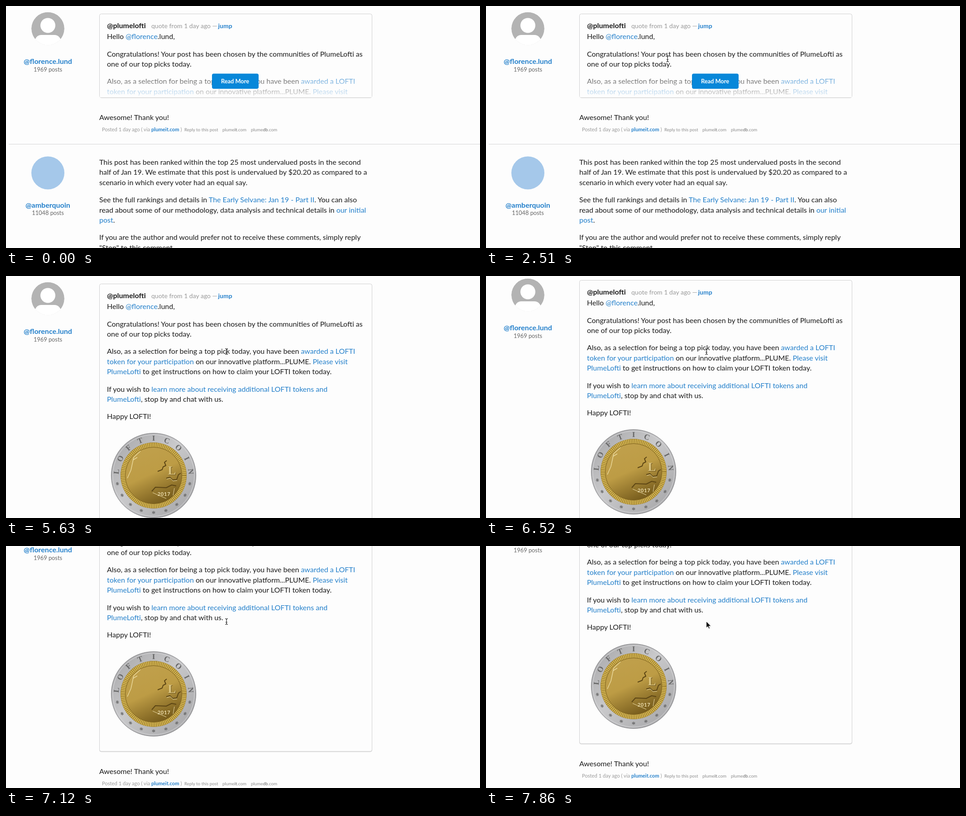
An HTML page for the animation above (8 s loop, 1047 by 535 pixels).

```html
<!DOCTYPE html>
<html lang="en">
<head>
<meta charset="utf-8">
<title>Forum thread</title>
<style>
  html, body { margin: 0; width: 100%; height: 100%; overflow: hidden; background: #fdfdfd; }
  svg { display: block; }
  text { font: 16px Lato, sans-serif; fill: #1b1b1b; white-space: pre; }
  a { fill: #2480cb; }
  .bold, .name { font-weight: 700; }
  .name { fill: #2480cb; }
  .name, .count, .mid { text-anchor: middle; }
  .count { font-size: 12.8px; fill: #666; }
  .quote { font-size: 14px; fill: #999; }
  .meta { font-size: 11.2px; fill: #999; }
  .tiny { font-size: 9.8px; fill: #8c8c8c; }
  .button { font-size: 12.8px; font-weight: 700; fill: #fff; }
  #box { filter: drop-shadow(0 1px 0 #0002); }
  .serif { font-family: "Liberation Serif", serif; font-weight: 700; }
  #ring text { font-size: 17px; fill: #686868; }
</style>
</head>
<body>
<svg width="1047" height="535" viewBox="0 0 1047 535">
  <defs>
    <linearGradient id="fade" x2="0" y2="1">
      <stop stop-color="#fdfdfd" stop-opacity="0"/>
      <stop offset="1" stop-color="#fdfdfd" stop-opacity=".88"/>
    </linearGradient>
    <linearGradient id="silver" x2="1" y2="1">
      <stop stop-color="#a4a4a6"/>
      <stop offset=".45" stop-color="#c9c9cb"/>
      <stop offset="1" stop-color="#a2a2a4"/>
    </linearGradient>
    <linearGradient id="gold" x1=".3" x2=".75" y2="1">
      <stop stop-color="#c0a04c"/>
      <stop offset=".45" stop-color="#bd9c45"/>
      <stop offset="1" stop-color="#6f5518"/>
    </linearGradient>
    <clipPath id="round"><circle cx="92.5" cy="50" r="36.5"/></clipPath>
  </defs>

  <g id="page">
    <g clip-path="url(#round)">
      <circle cx="92.5" cy="50" r="36.5" fill="#b3b3b3"/>
      <circle cx="92.5" cy="43" r="16.5" fill="#fff"/>
      <rect x="64" y="64" width="57" height="40" rx="14" fill="#fff"/>
    </g>
    <text class="name" x="92.5" y="128">@florence.lund</text>
    <text class="count" x="92.5" y="145">1969 posts</text>

    <rect id="box" x="206.5" y="17.5" width="602" rx="4" fill="#fdfdfd" stroke="#cfcfd0"/>
    <text class="bold" x="223" y="49">@plumelofti</text>
    <text class="quote" x="321" y="49">quote from 1 day ago —</text>
    <text class="quote" x="468.5" y="49"><a id="jump" class="bold">jump</a></text>
    <text x="223" y="73">Hello <a>@florence</a>.lund,</text>
    <text x="223" y="112">Congratulations! Your post has been chosen by the communities of PlumeLofti as</text>
    <text x="223" y="134">one of our top picks today.</text>
    <text x="223" y="172">Also, as a selection for being a top pick today, you have been <a>awarded a LOFTI</a></text>
    <text x="223" y="195"><a>token for your participation</a> on our innovative platform...PLUME. <a>Please visit</a></text>

    <g id="fold">
      <rect x="207" y="135" width="601" height="67" fill="url(#fade)"/>
      <rect x="455" y="149.5" width="103" height="33.5" rx="4" fill="#0787d9"/>
      <text class="button mid" x="506" y="171">Read More</text>
    </g>

    <g id="more">
      <text x="223" y="217"><a>PlumeLofti</a> to get instructions on how to claim your LOFTI token today.</text>
      <text x="223" y="256">If you wish to <a>learn more about receiving additional LOFTI tokens and</a></text>
      <text x="223" y="278"><a>PlumeLofti</a>, stop by and chat with us.</text>
      <text x="223" y="316">Happy LOFTI!</text>
      <g transform="translate(326 441)" fill="none" stroke-linejoin="round">
        <circle r="93.5" fill="url(#silver)" stroke="#77777a"/>
        <circle r="90" stroke="#d6d6d8"/>
        <g id="ring"></g>
        <circle r="73" fill="#8a6d22"/>
        <circle r="67.5" stroke="#d3b554" stroke-width="10"/>
        <circle r="67.5" stroke="#8d6f23" stroke-width="10" stroke-dasharray="1.2 2.6"/>
        <circle r="62.5" fill="url(#gold)" stroke="#7e621d"/>
        <path d="M-29-54L-44-40L-50-12L-58 6M-46-34L-36-40" stroke="#e9d79a" stroke-width="1.5"/>
        <path d="M9-9L19-13L21-19L27-22L24-29L29-33M28 6L36 4L42 10L51 9L55-2L60-5M-4 35L4 26L28 27L40 21L50 23" stroke="#5c4514" stroke-width="2"/>
        <path d="M29 8L37 6L43 12L52 11M-2 38L28 51M43 44L46 28" stroke="#ecdca6"/>
        <text class="serif mid" x="41.5" y="-1.5" style="font-size:27px;fill:#6a511a">L</text>
        <text class="serif mid" x="40.5" y="-2.5" style="font-size:27px;fill:#dcc682">L</text>
        <text class="mid bold" x="23" y="45" style="font-size:11px;letter-spacing:.8px;fill:#efe0b0">2017</text>
      </g>
    </g>

    <g id="rest">
      <text x="206" y="252">Awesome! Thank you!</text>
      <text class="meta" x="212" y="277">Posted 1 day ago ( via <a class="bold">plumeit.com</a> )</text>
      <text class="tiny" x="394" y="277">Reply to this post</text>
      <text class="tiny" x="478" y="277">plume<tspan class="bold">it</tspan>.com</text>
      <text class="tiny" x="541" y="277">plume<tspan class="bold">db</tspan>.com</text>
      <path d="M6 305.5H1047" stroke="#d4d4d5"/>

      <circle cx="92.5" cy="369" r="36.5" fill="#a5c8ea"/>
      <text class="name" x="92.5" y="446">@amberquoin</text>
      <text class="count" x="92.5" y="462">11048 posts</text>
      <text x="206" y="351">This post has been ranked within the top 25 most undervalued posts in the second</text>
      <text x="206" y="373">half of Jan 19. We estimate that this post is undervalued by $20.20 as compared to a</text>
      <text x="206" y="396">scenario in which every voter had an equal say.</text>
      <text x="206" y="434">See the full rankings and details in <a>The Early Selvane: Jan 19 - Part II</a>. You can also</text>
      <text x="206" y="457">read about some of our methodology, data analysis and technical details in <a>our initial</a></text>
      <text x="206" y="479"><a>post</a>.</text>
      <text x="206" y="517">If you are the author and would prefer not to receive these comments, simply reply</text>
      <text x="206" y="540">"Stop" to this comment.</text>
    </g>
  </g>

  <g id="cursor" stroke-linejoin="round">
    <path id="arrow" d="M-.5-.5V14L3 11L5.2 16L7.6 15L5.4 10.2H10Z" fill="#111" stroke="#fff"/>
    <g id="beam" fill="none">
      <path d="M-3-6.5Q0-6.5 0-4Q0-6.5 3-6.5M0-4V4M-3 6.5Q0 6.5 0 4Q0 6.5 3 6.5M-2 1.5H2" stroke="#fff" stroke-width="2.4" opacity=".7"/>
      <path d="M-3-6.5Q0-6.5 0-4Q0-6.5 3-6.5M0-4V4M-3 6.5Q0 6.5 0 4Q0 6.5 3 6.5M-2 1.5H2" stroke="#111" stroke-width="1.1"/>
    </g>
    <path id="hand" d="M-1.5 8V1Q-1.5-.5-.3-.5Q1-.5 1 1V5.5Q2.2 4.3 3.4 6Q4.8 4.8 5.8 6.8Q7.4 6 8.2 8V11Q8 13 6.8 14.2V16H.2V14.4Q-2 12-4.4 8.4Q-4.6 6.4-2.8 6.8Z" fill="#fff" stroke="#111" stroke-width="1.1"/>
  </g>
</svg>
<script>
const LOOP = 8000, TICK = 148.2, GROWTH = 366;
const OPEN = 37;   // tick at which the quote unfolds

// [tick, x, y] of the pointer's hot spot
const path = [
  [4, 929, 269], [5, 797, 257], [7, 690, 200], [9, 630, 118], [11, 603, 81], [12, 603, 81],
  [14, 560, 88], [15, 480, 96], [16, 357, 134], [17, 401, 117], [18, 440, 88], [19, 462, 62],
  [20, 471, 49], [25, 472, 49], [27, 486, 49], [28, 486, 49], [31, 487, 105], [33, 487, 167]
];
// [tick, pointer shape]
const shapes = [
  [4, 'arrow'], [9, 'beam'], [20, 'hand'], [29, 'arrow'], [30, 'beam'],
  [33, 'hand'], [38, 'beam'], [53, 'arrow']
];
// [tick, page offset]
const scroll = [
  [0, 0], [43, 0], [44, 8], [46, 69], [48, 114], [50, 151], [51, 148], [53, 131]
];

const $ = id => document.getElementById(id);
const show = (id, on) => $(id).style.display = on ? '' : 'none';
const move = (id, x, y) => $(id).setAttribute('transform', `translate(${x} ${y})`);
const lastKey = (keys, n) => Math.max(0, keys.filter(k => k[0] <= n).length - 1);

function sample(keys, n) {
  const i = lastKey(keys, n), a = keys[i], b = keys[i + 1] || a;
  const p = b === a ? 0 : Math.max(0, (n - a[0]) / (b[0] - a[0]));
  return a.slice(1).map((v, j) => v + (b[j + 1] - v) * p);
}

const ringText = (s, angle, y) =>
  `<text class="serif mid" y="${y}" transform="rotate(${angle})">${s}</text>`;
$('ring').innerHTML =
  [...'LOFTICOIN'].map((c, i) => ringText(c, (i - 4) * 21, -77)).join('') +
  [...'*********'].map((c, i) => ringText(c, 180 + (i - 4) * 19.3, -74)).join('');

function draw(now) {
  const n = Math.floor((now % LOOP + 15) / TICK);
  const open = n >= OPEN;
  show('fold', !open);
  show('more', open);
  $('box').setAttribute('height', 184.5 + (open ? GROWTH : 0));
  move('rest', 0, open ? GROWTH : 0);
  move('page', 0, -Math.round(sample(scroll, n)[0]));

  const shape = shapes[lastKey(shapes, n)][1];
  show('cursor', n >= 4);
  for (const id of ['arrow', 'beam', 'hand']) show(id, id === shape);
  move('cursor', ...sample(path, n).map(Math.round));
  $('jump').style.fill = shape === 'hand' && n < 29 ? '#1a68b5' : '';
  requestAnimationFrame(draw);
}
requestAnimationFrame(draw);
</script>
</body>
</html>
```
